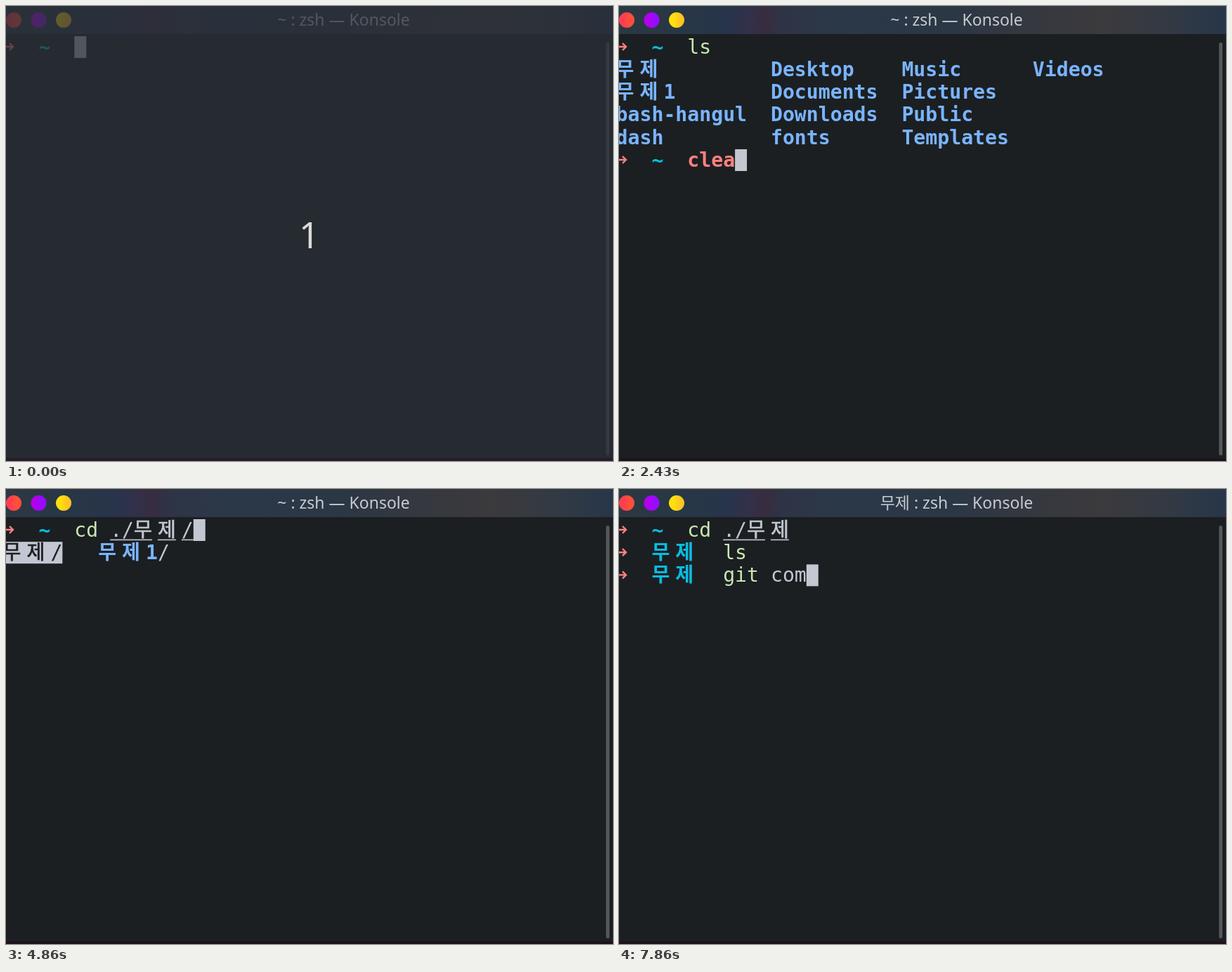
An HTML page with a canvas for the animation above (8000 ms loop, 864 by 648 pixels).

```html
<!DOCTYPE html>
<html lang="ko">
<head>
<meta charset="utf-8">
<title>Terminal</title>
<style>
html, body { margin: 0; width: 100%; height: 100%; overflow: hidden; background: #1b1f22; }
canvas { display: block; }
</style>
</head>
<body>
<canvas id="stage" width="864" height="648"></canvas>
<script>
const ctx = document.getElementById('stage').getContext('2d');
const LOOP = 8000;
const X0 = -4.4, CELL = 16.95, TOP = 43, ROW = 32.2, BASE = 24.8;
const SIZE = 28.15, WIDE = SIZE * 0.92;
const MONO = '"DejaVu Sans Mono", "Noto Sans CJK KR", "Noto Sans CJK", monospace';
const HANGUL = '"Noto Sans CJK KR", "Noto Sans CJK", sans-serif';
const SANS = '"Noto Sans", "Noto Sans CJK KR", "Noto Sans CJK", sans-serif';
const BG = '#1b1f22', FG = '#c3c7d1';

// Text styles, keyed by the letter that starts each part of a line
const STYLES = {
  w: { color: FG },
  u: { color: FG, underline: true },
  g: { color: '#c9e6b0' },
  r: { color: '#ff8080', bold: true },
  b: { color: '#7ab4ff', bold: true },
  c: { color: '#0bbce0', bold: true },
  s: { color: BG, box: true },
  p: { color: BG, box: true, tight: true }
};

const colX = col => X0 + col * CELL;
const isWide = ch => ch >= '\u3131';
const rect = (x, y, w, h, color) => { ctx.fillStyle = color; ctx.fillRect(x, y, w, h); };

function gradient(x0, y0, x1, y1, stops) {
  const g = ctx.createLinearGradient(x0, y0, x1, y1);
  stops.forEach(([at, color]) => g.addColorStop(at, color));
  return g;
}

function glyph(ch, x, y, style) {
  const wide = isWide(ch);
  ctx.font = `${style.bold ? 'bold ' : ''}${SIZE}px ${wide ? HANGUL : MONO}`;
  ctx.fillStyle = ctx.strokeStyle = style.color;
  ctx.fillText(ch, x, y);
  if (wide && !style.bold) {
    ctx.lineWidth = 0.7;
    ctx.strokeText(ch, x, y);
  }
}

function arrow(row) {
  const y = 58 + row * ROW;
  ctx.strokeStyle = STYLES.r.color;
  ctx.lineWidth = 2.4;
  ctx.beginPath();
  ctx.moveTo(-3, y);
  ctx.lineTo(9.5, y);
  ctx.moveTo(5, y - 5);
  ctx.lineTo(10, y);
  ctx.lineTo(5, y + 5);
  ctx.stroke();
}

// Parts: "style:text", "@n" jumps to column n, ">" is the prompt arrow, "|" the cursor
function drawLine(row, parts) {
  const top = TOP + row * ROW, y = top + BASE;
  let col = 0;
  for (const part of parts) {
    if (part === '|') { rect(colX(col), top, CELL, 31, FG); continue; }
    if (part === '>') { arrow(row); col = 3; continue; }
    if (part[0] === '@') { col = +part.slice(1); continue; }
    const style = STYLES[part[0]], chars = [...part.slice(2)];
    const cells = chars.reduce((n, ch) => n + (isWide(ch) ? 2 : 1), 0);
    if (style.box) rect(colX(col), top, cells * CELL, 31, FG);
    let x = colX(col);
    for (const ch of chars) {
      const step = isWide(ch) ? WIDE : CELL;
      if (ch !== ' ') glyph(ch, x, y, style);
      if (style.underline) rect(x, top + 28.6, step, 1.6, FG);
      x += isWide(ch) && !style.tight ? 2 * CELL : step;
    }
    col += cells;
  }
}

const home = (...rest) => ['>', 'c:~', '@6', ...rest];
const inDir = (...rest) => ['>', 'c:무제', '@9', ...rest];
const listing = last => [
  home('g:ls'),
  ['b:무제', '@13', 'b:Desktop', '@24', 'b:Music', '@35', 'b:Videos'],
  ['b:무제1', '@13', 'b:Documents', '@24', 'b:Pictures'],
  ['b:bash-hangul', '@13', 'b:Downloads', '@24', 'b:Public'],
  ['b:dash', '@13', 'b:fonts', '@24', 'b:Templates'],
  last
];
const wentIn = home('g:cd', 'w: ', 'u:./무제');
const inside = (...rest) => [wentIn, inDir('g:ls'), rest];

// Screen contents from each moment on
const SCREENS = [
  [0, [home('|')]],
  [290, [home('g:ls', '|')]],
  [570, [home('g:ls', 'w: ', '|')]],
  [1000, listing(['|'])],
  [1430, listing(home('|'))],
  [1570, listing(home('r:c', '|'))],
  [1860, listing(home('r:cle', '|'))],
  [2000, listing(home('g:clear', '|'))],
  [2430, listing(home('r:clea', '|'))],
  [2570, [home('|')]],
  [3000, [home('r:c', '|')]],
  [3140, [home('r:c', 'p:ㅇ')]],
  [3285, [home('r:c', '|')]],
  [3428, [home('g:cd', 'w: ', '|')]],
  [3570, [home('g:cd', 'w: ', 'u:./', '|')]],
  [3713, [home('g:cd', 'w: ', 'u:./', 'p:ㅁ')]],
  [3856, [home('g:cd', 'w: ', 'u:./', 'p:무')]],
  [4000, [home('g:cd', 'w: ', 'u:./무제', '|')]],
  [4430, [home('g:cd', 'w: ./무제', '|'), ['b:무제', 'w:/', '@8', 'b:무제1', 'w:/']]],
  [4860, [home('g:cd', 'w: ', 'u:./무제/', '|'), ['s:무제/', '@8', 'b:무제1', 'w:/']]],
  [5430, [wentIn, ['|']]],
  [5570, [wentIn, inDir('|')]],
  [5860, [wentIn, inDir('p:ㅣㄴ')]],
  [6000, inside('|')],
  [6430, inside(...inDir('|'))],
  [7000, inside(...inDir('r:g', '|'))],
  [7290, inside(...inDir('g:git', 'w: ', '|'))],
  [7570, inside(...inDir('g:git', 'w: c', '|'))],
  [7715, inside(...inDir('g:git', 'w: co', '|'))],
  [7860, inside(...inDir('g:git', 'w: com', '|'))]
];

function button(x, left, right) {
  ctx.fillStyle = gradient(x - 11, 0, x + 11, 0, [[0.3, left], [0.7, right]]);
  ctx.beginPath();
  ctx.arc(x, 20, 11, 0, Math.PI * 2);
  ctx.fill();
}

function centered(text, x, y, size, color) {
  ctx.font = `${size}px ${SANS}`;
  ctx.fillStyle = color;
  ctx.textAlign = 'center';
  ctx.fillText(text, x, y);
  ctx.textAlign = 'left';
}

function drawWindow(title) {
  rect(0, 0, 864, 648, BG);
  rect(0, 0, 864, 40, gradient(0, 0, 864, 0, [
    [0, '#2c3843'], [0.1, '#283746'], [0.18, '#27344a'], [0.215, '#33304a'],
    [0.24, '#382c40'], [0.27, '#2e3446'], [0.36, '#2b3848'], [0.55, '#2b3745'],
    [0.68, '#35383f'], [0.8, '#3b3a3d'], [0.9, '#333a43'], [1, '#27364a']
  ]));
  rect(0, 0, 864, 1, '#34383c');
  button(11, '#ff3f50', '#ff4f38');
  button(46.5, '#b200ee', '#960cff');
  button(82, '#ffe00c', '#ffc622');
  centered(title, 480.5, 28, 23, '#c8cbd0');
  ctx.fillStyle = '#53575a';
  ctx.beginPath();
  ctx.roundRect(854, 52, 5, 588, 2.5);
  ctx.fill();
  rect(0, 644.5, 864, 3.5, '#1e111c');
}

function draw(t) {
  drawWindow((t < 6000 ? '~' : '무제') + ' : zsh — Konsole');
  SCREENS.findLast(([at]) => at <= t)[1].forEach((parts, row) => drawLine(row, parts));
  if (t < 290) {
    rect(0, 0, 864, 644.5, 'rgba(42,46,55,0.74)');
    rect(0, 644.5, 864, 3.5, '#2a1c2c');
    centered('1', 431.5, 345, 51, '#dcdad5');
  }
}

const start = performance.now();
function tick() {
  draw((performance.now() - start) % LOOP);
  requestAnimationFrame(tick);
}
tick();
</script>
</body>
</html>
```
